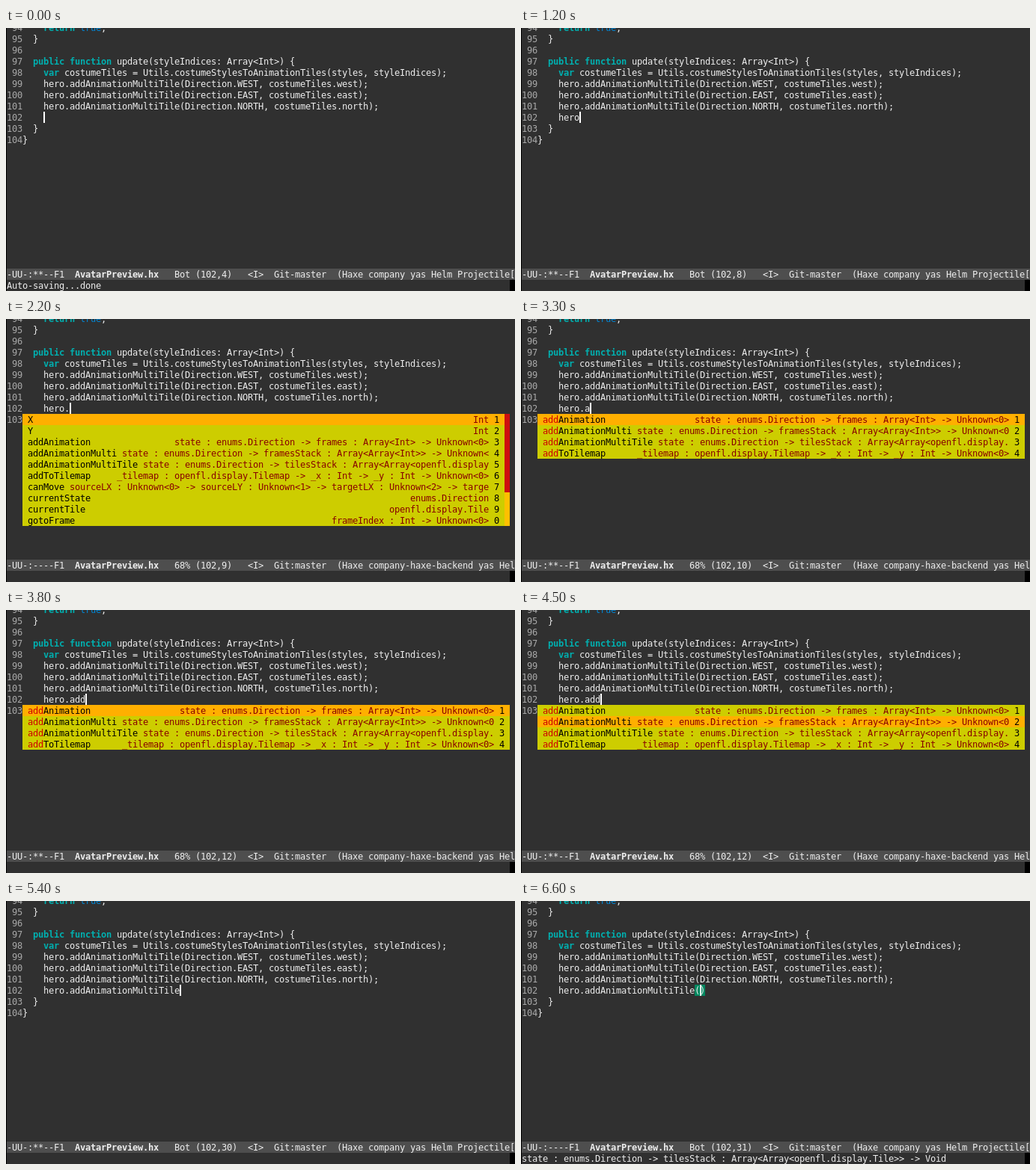
Write an HTML page that moves like this. It is 680 px wide and 352 px high and loops after 8 s.

```html
<!DOCTYPE html>
<html lang="en">
<head>
<meta charset="utf-8">
<title>Editor completion</title>
<style>
  html, body { margin: 0; width: 100%; height: 100%; overflow: hidden; background: #000; }
  #term {
    position: absolute; left: 0; top: 0; width: 680px; height: 352px; overflow: hidden;
    font: 12px "DejaVu Sans Mono", monospace;
    letter-spacing: calc(7px - 1ch);
    color: #eee;
  }
  #term i {
    position: absolute; height: 15px; line-height: 17px;
    white-space: pre; font-style: normal;
  }
  #term .page { left: 1px; top: 0; width: 679px; height: 322px; background: #303030; }
  #term .mode { background: #4e4e4e; }
  #term .mini { background: #303030; }
  #term .num { color: #a8a8a8; }
  #term .key { color: #00afaf; font-weight: bold; }
  #term .const { color: #0087d7; }
  #term .name { font-weight: bold; }
  #term .item { background: #cdcd00; }
  #term .sel { background: #ffaf00; }
  #term .label { color: #000; }
  #term .note { color: #870000; }
  #term .common { color: #cd0000; }
  #term .thumb { background: #cd0f0f; }
  #term .track { background: #ffc000; }
  #term .paren { background: #00875f; }
  #term .caret { background: #fff; }
</style>
</head>
<body>
<div id="term"></div>
<script>
const LOOP = 8000, CELL = 7, LINE = 15, COLS = 97;
const FIRST = 94, EDIT = 102, MODE_ROW = 22, MINI_ROW = 23;
const term = document.getElementById('term');

const code = {
  94: '    return true;',
  95: '  }',
  96: '',
  97: '  public function update(styleIndices: Array<Int>) {',
  98: '    var costumeTiles = Utils.costumeStylesToAnimationTiles(styles, styleIndices);',
  99: '    hero.addAnimationMultiTile(Direction.WEST, costumeTiles.west);',
  100: '    hero.addAnimationMultiTile(Direction.EAST, costumeTiles.east);',
  101: '    hero.addAnimationMultiTile(Direction.NORTH, costumeTiles.north);',
  102: '',
  103: '  }',
  104: '}'
};

const dir = 'state : enums.Direction -> ';
const adds = [
  ['addAnimation', dir + 'frames : Array<Int> -> Unknown<0>'],
  ['addAnimationMulti', dir + 'framesStack : Array<Array<Int>> -> Unknown<0>'],
  ['addAnimationMultiTile', dir + 'tilesStack : Array<Array<openfl.display.Tile>> -> Unknown<0>'],
  ['addToTilemap', '_tilemap : openfl.display.Tilemap -> _x : Int -> _y : Int -> Unknown<0>']
];
const members = [
  ['X', 'Int'],
  ['Y', 'Int'],
  ...adds,
  ['canMove', 'sourceLX : Unknown<0> -> sourceLY : Unknown<1> -> targetLX : Unknown<2> -> targetLY : Unknown<3>'],
  ['currentState', 'enums.Direction'],
  ['currentTile', 'openfl.display.Tile'],
  ['gotoFrame', 'frameIndex : Int -> Unknown<0>']
];

const file = '/home/pvk/dev/openfl-yarpge/Source/components/AvatarPreview.hx';
const call = 'hero.addAnimationMultiTile';
const wrote = 'Wrote ' + file;

const steps = [
  { at: 0, text: '', mini: 'Auto-saving...done' },
  { at: 500, text: 'h' },
  { at: 800, text: 'he' },
  { at: 900, text: 'her' },
  { at: 1200, text: 'hero' },
  { at: 1500, text: 'hero.' },
  { at: 2000, text: 'hero.', mini: 'Saving file ' + file + '...' },
  { at: 2100, text: 'hero.', mini: wrote },
  { at: 2200, text: 'hero.', list: members, sel: 0, saved: true },
  { at: 3300, text: 'hero.a', list: adds, sel: 0 },
  { at: 3500, text: 'hero.ad', list: adds, sel: 0 },
  { at: 3800, text: 'hero.add', list: adds, sel: 0 },
  { at: 4500, text: 'hero.add', list: adds, sel: 1 },
  { at: 4700, text: 'hero.add', list: adds, sel: 2 },
  { at: 5400, text: call },
  { at: 5900, text: call + '(', pair: true },
  { at: 6500, text: call + '(', pair: true, mini: wrote },
  { at: 6600, text: call + '(', pair: true, saved: true,
    mini: dir + 'tilesStack : Array<Array<openfl.display.Tile>> -> Void' }
];

// Rows start 8px above the stage, columns 1px in from the left.
function put(row, col, text, cls = '', cols = text.length, rows = 1) {
  const el = document.createElement('i');
  el.className = cls;
  el.textContent = text;
  el.style.left = 1 + col * CELL + 'px';
  el.style.top = row * LINE - 8 + 'px';
  el.style.width = cols * CELL + 'px';
  el.style.height = rows * LINE + 'px';
  term.append(el);
  return el;
}

function drawCode(last) {
  const page = document.createElement('i');
  page.className = 'page';
  term.append(page);
  for (let n = FIRST; n <= last; n++) {
    const row = n - FIRST;
    put(row, 0, String(n).padStart(3), 'num');
    for (const m of code[n].matchAll(/\b(return|public function|var|true)\b|.+?(?=\b(?:return|public|var|true)\b|$)/g)) {
      const cls = m[1] === 'true' ? 'const' : m[1] ? 'key' : '';
      put(row, 3 + m.index, m[0], cls);
    }
  }
}

function drawList({ list, sel }) {
  const top = EDIT + 1 - FIRST;
  const scroll = list === members;
  const edge = scroll ? 92 : 93;
  list.forEach(([label, note], i) => {
    const row = top + i;
    const start = Math.max(5 + label.length, edge - note.length);
    put(row, 3, '', i === sel ? 'item sel' : 'item', edge);
    const common = scroll ? 0 : 3;
    put(row, 4, label.slice(0, common), 'common');
    put(row, 4 + common, label.slice(common), 'label');
    put(row, start, note.slice(0, edge - start), 'note');
    put(row, edge + 1, String((i + 1) % 10), 'label');
  });
  if (scroll) {
    put(top, 95, '', 'thumb', 1, 7);
    put(top + 7, 95, '', 'track', 1, 3);
  }
}

function drawStatus(s) {
  const pos = `(${EDIT},${4 + s.text.length})`.padEnd(10);
  const git = s.at < 2200 ? 'Git-master' : 'Git:master';
  const minor = s.list ? 'company-haxe-backend yas Helm' : 'company yas Helm Projectile[';
  const tail = `${s.list ? '68%' : 'Bot'} ${pos}<I>  ${git}  (Haxe ${minor}`;
  put(MODE_ROW, 0, '', 'mode', COLS);
  put(MODE_ROW, 0, `-UU-:${s.saved ? '--' : '**'}--F1`);
  put(MODE_ROW, 13, 'AvatarPreview.hx', 'name');
  put(MODE_ROW, 32, tail.slice(0, COLS - 32));
  put(MINI_ROW, 0, s.mini || '', 'mini', COLS - 1);
}

function draw(s) {
  term.replaceChildren();
  drawCode(s.list ? 103 : 104);
  const row = EDIT - FIRST, end = 7 + s.text.length;
  put(row, 7, s.pair ? call : s.text);
  if (s.pair) {
    put(row, end - 1, '(', 'paren');
    put(row, end, ')', 'paren');
  }
  if (s.list) drawList(s);
  drawStatus(s);
  put(row, end, '', 'caret').style.width = '2px';
}

let shown, origin;
function tick(now) {
  origin ??= now;
  const t = (now - origin) % LOOP;
  const s = steps.findLast(step => step.at <= t) || steps[0];
  if (s !== shown) draw(shown = s);
  requestAnimationFrame(tick);
}
draw(shown = steps[0]);
requestAnimationFrame(tick);
</script>
</body>
</html>
```
